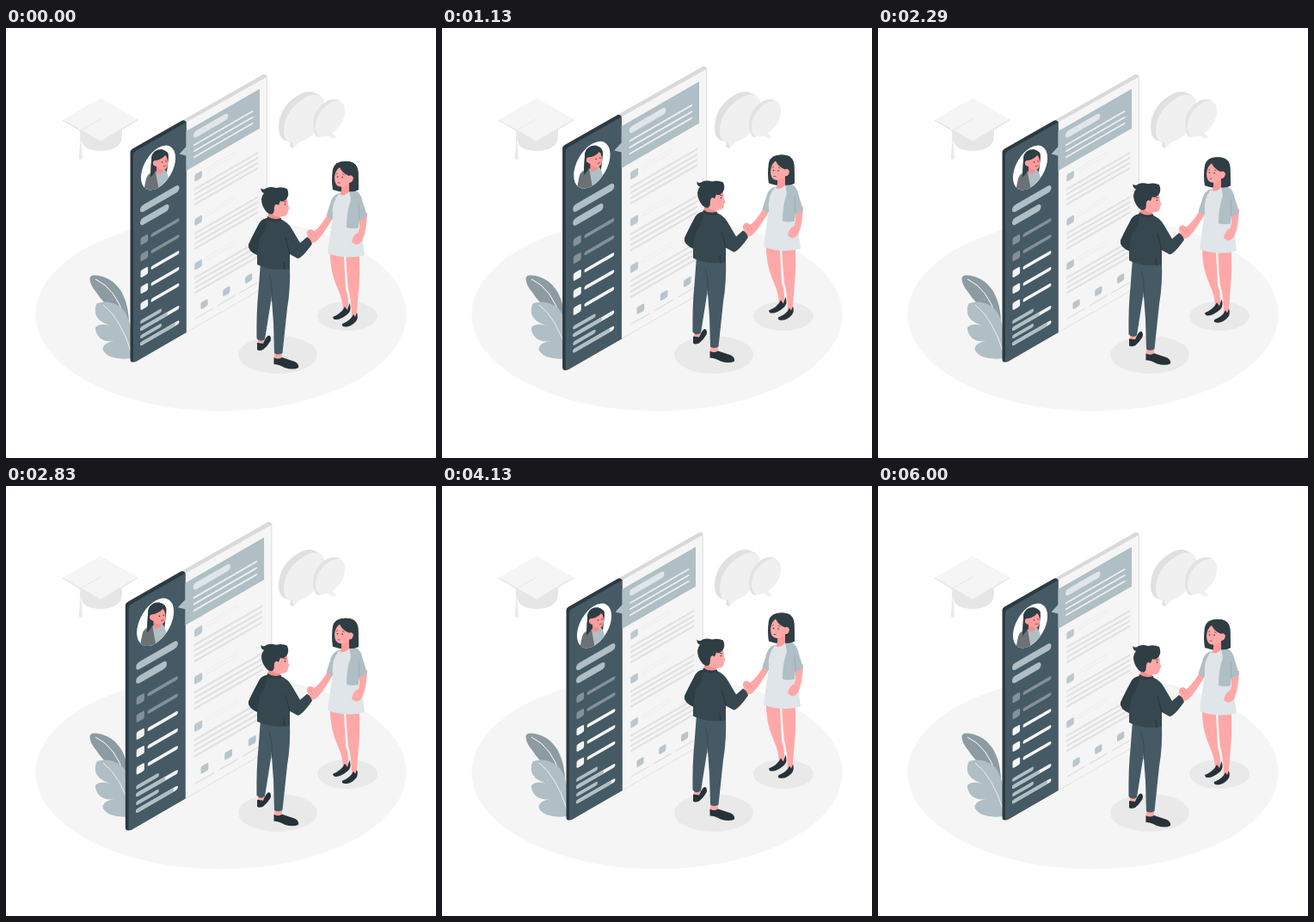
Recreate the animation shown at these times as an HTML page. Size 500 by 500 pixels, loop 6.04 s.

```html
<!DOCTYPE html>
<html lang="en">
<head>
<meta charset="utf-8">
<title>Job agreement</title>
<style>
  html, body { margin: 0; width: 100%; height: 100%; overflow: hidden; background: #fff; }
  svg { display: block; width: 100%; height: 100%; }
</style>
</head>
<body>
<svg viewBox="0 0 500 500" xmlns="http://www.w3.org/2000/svg">
  <defs>
    <clipPath id="portrait"><circle r="23.2" transform="matrix(.866 -.5 0 1 177 162.5)"/></clipPath>
  </defs>

  <ellipse cx="250" cy="333" rx="215.5" ry="112.5" fill="#f5f5f5"/>
  <ellipse cx="316" cy="380" rx="46" ry="22" fill="#e9e9e9"/>
  <ellipse cx="397" cy="335" rx="35" ry="17" fill="#e9e9e9"/>

  <g id="cap">
    <path d="M87 113V128Q88 143 111 143Q134 142 135 126V113Z" fill="#e6e6e6"/>
    <path d="M66 106.500V108L110 133.500L153 107.500V106Z" fill="#e6e6e6"/>
    <path d="M66 106.500L110 81.500L153 106L110 131.500Z" fill="#f5f5f5"/>
    <path d="M110 106L86.500 119V136" fill="none" stroke="#e9e9e9" stroke-width="1.2"/>
    <path d="M86 135L84.500 152Q87 154 89 152L88 135Z" fill="#ebebeb"/>
  </g>

  <g id="bubbles">
    <path d="M317 116Q317 92 340 78Q350 72 358 75L365 78L338 130L334 140L330 138L331 133L323 130Q317 126 317 116Z" fill="#e0e0e0"/>
    <path d="M323 120Q323 97 346 82Q356 76 364 78Q371 81 371 94Q370 116 348 130L341 133L334 140L333 133Q323 132 323 120Z" fill="#f0f0f0"/>
    <path d="M357 112Q357 95 373 85Q381 81 388 84L376 124L362 127Q357 122 357 112Z" fill="#e3e3e3"/>
    <path d="M360 114Q361 98 376 88Q384 83 389 85Q394 88 394 97Q393 113 379 122L384 127L380 128.500L374 125Q360 130 360 114Z" fill="#f0f0f0"/>
  </g>

  <g id="leaves" fill="none">
    <path d="M97.500 292Q97 286 108 288Q125 291 135 308Q144 325 143 350Q131 343 126 330Q113 320 104 306Q98 299 97.500 292Z" fill="#8d9ba2"/>
    <path d="M104 292Q128 303 138 338" stroke="#fff" stroke-width="1"/>
    <path d="M106 320Q122 315 135 326Q147 338 150 383Q136 387 121 382Q112 377 112.500 372Q114 366 126 364Q113 366 107 358Q102 350 105 347Q110 343 121 346Q106 341 104 332Q103 324 106 320Z" fill="#b0bec5"/>
    <path d="M113 322Q133 337 146 378" stroke="#f5f5f5" stroke-width=".9"/>
  </g>

  <g id="board"></g>

  <g id="people">
    <g id="woman">
      <path d="M377 258Q376 282 386 304Q392 317 392 330L398 328Q399 314 395 304Q394 285 392.500 258Z" fill="#ffa8a7"/>
      <path d="M395 258H410.500Q412 285 410 305Q409 320 407 338L402 338Q402 317 398 303Q396 285 395 258Z" fill="#ffa8a7"/>
      <path d="M380 336Q390 332 394 324L397 328L399.500 320Q402 328 398 332Q389 340 382 339Q380 338 380 336Z" fill="#263238"/>
      <path d="M391 344Q401 340 404 333L406 336L408 331Q410 337 407 341Q400 349 392 347Q390 346 391 344Z" fill="#263238"/>
      <path d="M380 164Q382 155 395 155Q409 155 409.500 168L410 188Q400 193 387 190L380 188Q378 177 380 164Z" fill="#2f3e45"/>
      <path d="M390 178H399V190Q396 198 387 196L390 189Z" fill="#ff9a9a"/>
      <path d="M375 215Q368 228 360 235L354 239L357 249Q363 247 368 240L381 220Z" fill="#ffa8a7"/>
      <path d="M388 192Q380 194 378 201L372.500 218Q376 222 381 222L389 205Z" fill="#b0bec5"/>
      <path d="M387 193Q393 197 399 190L405 199L410 232L414 241L417 264Q396 270 374 262L377 239L380 220Q378 203 387 193Z" fill="#dfe5e8"/>
      <path d="M410.500 216L420 215Q419 236 415 245Q413 251 407 252L402 249Q403 241 410 237L411 230Z" fill="#ffa8a7"/>
      <path d="M399 189L408 190Q413 193 415 203L420 219Q416 223 411 223L410 232Q403 234 396 232Q396 213 401 200Z" fill="#b0bec5"/>
      <path d="M410 204L411 223" stroke="#90a4ae" stroke-width=".7"/>
      <path d="M382 167Q382 162 388 162Q395 162 400 171Q404 170 404 175Q403 180 399 180Q395 185 389 184.500Q382 184 382 174Z" fill="#ffa8a7"/>
      <path d="M381 166Q382 155 395 155Q409 155 409.500 168L410 188Q405 191 399 190V180Q404 180 404 174Q402 170 399 172Q391 169 388 162Q383 165 382 174Z" fill="#2f3e45"/>
      <path d="M384 170L386 169M391 169.500L393.500 171M385.500 180L388.500 180" fill="none" stroke="#263238" stroke-width=".6"/>
      <circle cx="385.500" cy="173" r=".8" fill="#263238"/><circle cx="391" cy="173.500" r=".8" fill="#263238"/>
    </g>

    <g id="man">
      <path d="M293 357H301L300 369L293 370Z M312 373H321V386H312Z" fill="#ffa8a7"/>
      <path d="M292 366L299 367Q303 357 306 357.500Q309 359 307.500 364Q304 370 299 374Q294 376 292 374Z" fill="#263238"/>
      <path d="M311.500 383Q316 386 321 383Q330 386 336 388Q341 391 340 395Q334 398 324 395Q317 391 311.500 391Z" fill="#263238"/>
      <path d="M296 273L293.500 306Q291 330 291.500 361Q296 366 301 362L308 318L313 275Z" fill="#455a64"/>
      <path d="M302 275H330Q331 303 327 326L321.500 378Q316 381 312 378L311 343L308.500 309Z" fill="#455a64"/>
      <path d="M309 318Q310 297 306 287" fill="none" stroke="#37474f" stroke-width=".8"/>
      <path d="M306 210H319V225Q312 227 304 222Z" fill="#f28f8f"/>
      <path d="M310 205L318 199L326 196Q328 201 328 206L329.500 210L328 212Q328 219 322 219Q314 221 310 216Z" fill="#ffa8a7"/>
      <path d="M350 240Q349 234 355 234L363 239Q365 243 362 247Q358 251 354 249Z" fill="#ffa8a7"/>
      <path d="M353 237L357 243M357 237L361 242" stroke="#f28f8f" stroke-width=".8"/>
      <path d="M304 221Q296 222 293 230Q286 243 282 252Q281 259 292 264L292 275Q307 283 330 280L330 263L339 268Q344 268 356 251Q354 245 350 243L342 250L332 233Q328 226 319 222Q311 225 304 221Z" fill="#37474f"/>
      <path d="M304 221Q296 222 293 230Q286 243 282 252Q281 259 292 264L295 245Q305 232 304 221Z" fill="#2f3e45"/>
      <path d="M330 263L325 244M323 272L324 281" fill="none" stroke="#263238" stroke-width=".9"/>
      <path d="M304 219Q311 224 320 221V224Q311 227 303 223Z" fill="#2f3e45"/>
      <path d="M296.500 186Q299 189 303 186Q308 184 314 186Q321 184 327 187Q330 194 326 199Q322 203 319 201L317 206Q313 203 312 208L311.500 214Q309 219 303 214Q297 207 297 199Q298 194 300 192Q296 191 296.500 186Z" fill="#2f3e45"/>
      <path d="M323 202H326" stroke="#263238" stroke-width=".7"/>
      <circle cx="324.500" cy="205" r=".8" fill="#263238"/>
    </g>
  </g>
</svg>

<script>
const $ = id => document.getElementById(id);
const SLOPE = Math.tan(Math.PI / 6);

// Board contents are laid out flat, then skewed around the fold at x = 209.5.
const bar = (x1, x2, y, width, color) =>
  `<path d="M${x1 + width / 2} ${y}H${x2 - width / 2}" stroke="${color}" stroke-width="${width}" stroke-linecap="round"/>`;
const tile = (x, y, size, color) =>
  `<rect x="${x - size / 2}" y="${y - size / 2}" width="${size}" height="${size}" rx="1.8" fill="${color}"/>`;

function sidebar() {
  let out = bar(156, 201.5, 180.8, 8.3, '#b0bec5') + bar(156, 189.5, 195.9, 8.3, '#b0bec5');
  for (let i = 0; i < 5; i++) {
    const y = 218 + i * 18.9, color = i < 2 ? '#849199' : '#f5f5f5';
    out += tile(160.8, y, 8.6, color) + bar(168.5, 201.5, y, 4, color);
  }
  [[311.5, 319.7, 188], [328.8, 337, 197]].forEach(([label, meter, level]) => {
    out += bar(156, 181, label, 4.4, '#b0bec5');
    out += bar(156, 201.5, meter, 4.4, '#f0f0f0') + bar(156, level, meter, 4.4, '#b0bec5');
  });
  return out;
}

function page() {
  let out = '<path d="M209.500 120H295V166H209.500V148.500L201.500 142L209.500 138Z" fill="#b0bec5"/>';
  out += bar(218, 258.5, 130, 7.6, '#dfe5e8');
  for (let i = 0; i < 3; i++) out += bar(218, 287.5, 141.5 + i * 7, 2.1, '#ebeff1');
  for (let i = 0; i < 3; i++) {
    const y = 180.4 + i * 51.5;
    out += tile(223.6, y, 8.6, '#bcc8ce');
    out += bar(232, 266, y - 1.5, 4.6, '#ebebeb') + bar(232.6, 265.4, y - 1.5, 3.4, '#f5f5f5');
    for (let k = 0; k < 4; k++) out += bar(219, 293.5, y + 12.8 + k * 5.9, 2.3, '#e0e0e0');
  }
  for (let i = 0; i < 3; i++) {
    const x = 230.5 + i * 25.8;
    out += tile(x, 333.2, 8.2, '#b8c5cb') + bar(x - 10.5, x + 10.5, 344, 1.6, '#e0e0e0');
  }
  return out;
}

$('board').innerHTML = `
  <path d="M206 107L299 54Q302 53 303.500 56V300L209.500 354Z" fill="#d9d9d9"/>
  <path d="M209.500 109.500L303 57V300L209.500 354Z" fill="#f5f5f5"/>
  <path d="M303.200 57V300L209.500 354" fill="none" stroke="#dedede" stroke-width=".7"/>
  <path d="M144.500 144Q144.500 142 147 140.500L204 108Q207 106 209.500 109V354L150 388Q144.500 390 144.500 385Z" fill="#2c3a41"/>
  <path d="M148 148Q148 145 151 143L209.500 109.500V354L151 388Q148 389 148 386Z" fill="#455a64"/>
  <g fill="none" transform="matrix(1 ${-SLOPE} 0 1 0 ${209.5 * SLOPE})">${sidebar()}${page()}</g>
  <g clip-path="url(#portrait)">
    <path d="M150 130H205V195H150Z" fill="#fff"/>
    <path d="M169 150Q171 141 181 141Q190 143 189 151L187 168L169 174Z" fill="#2f3e45"/>
    <path d="M164 172Q166 168 173 167L184 164Q190 168 190 190H161Z" fill="#b0bec5"/>
    <path d="M163 175Q165 169 174 167L178 190H160Z" fill="#6b7175"/>
    <path d="M175 160L183 159V167Q178 172 175 168Z" fill="#f28f8f"/>
    <path d="M175 154Q182 152 185 148Q188 150 188 157Q188 164 183 165Q177 165 175 161Q170 162 170 157Q171 153 175 154Z" fill="#ff9c9c"/>
    <path d="M168 174Q168 152 171 147L176 147L174 154Q170 154 171 159L174 161L173 168Z" fill="#2f3e45"/>
    <circle cx="181.500" cy="156" r=".7" fill="#263238"/><circle cx="186" cy="155" r=".7" fill="#263238"/>
    <path d="M183 161L186 160" fill="none" stroke="#263238" stroke-width=".6"/>
  </g>`;

const LOOP = 6040, PERIOD = 6000, FLOAT = 3000, RISE = 10;
const beat = [[0, 1], [.1, 1.1], [.3, 1], [.4, 1], [.5, 1.1], [.6, 1], [1, 1]];

function interpolate(keys, p) {
  const i = keys.findIndex(([at]) => at > p);
  const [a, from] = keys[i - 1], [b, to] = keys[i];
  return from + (to - from) * (p - a) / (b - a);
}

function draw(time) {
  const t = time % LOOP % PERIOD;
  const scale = interpolate(beat, t / PERIOD);
  const lift = RISE * (1 - Math.abs(1 - 2 * (t % FLOAT) / FLOAT));
  $('board').setAttribute('transform', `translate(224 221.5) scale(${scale}) translate(-224 -221.5)`);
  $('people').setAttribute('transform', `translate(0 ${-lift})`);
}

let start;
function tick(now) {
  start ??= now;
  draw(now - start);
  requestAnimationFrame(tick);
}
draw(0);
requestAnimationFrame(tick);
</script>
</body>
</html>
```
